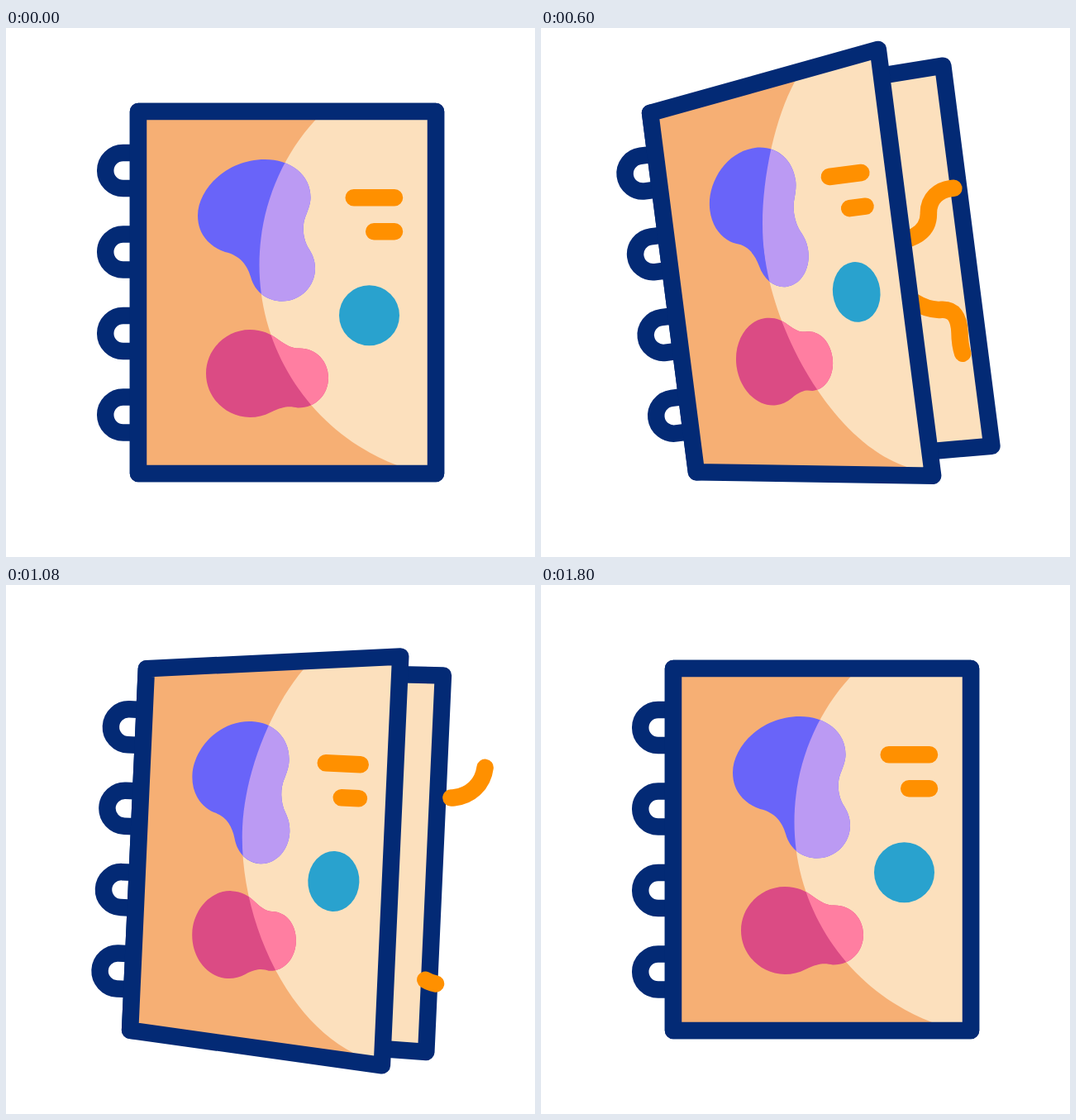
Recreate the animation shown at these times as an HTML page. Size 640 by 640 pixels, loop 2040 ms.

```html
<!DOCTYPE html>
<html lang="en">
<head>
<meta charset="utf-8">
<title>Sketchbook</title>
<style>
  html, body { margin: 0; width: 100%; height: 100%; overflow: hidden; background: #fff; }
  svg { display: block; width: 100%; height: 100%; }
  .line { fill: none; stroke-width: 20.5; stroke-linecap: round; stroke-linejoin: round; }
  .navy { stroke: #032a75; }
  .orange { stroke: #ff9000; }
</style>
</head>
<body>
<svg viewBox="0 0 640 640">
  <defs>
    <clipPath id="lit"><path id="litShape"/></clipPath>
    <path id="bean" d="M313 159C267 159 232 195 232 227C232 250 247 265 265 271C283 275 292 287 296 301C301 320 317 330.5 334 330.5C357 330.5 374 312 374 291C374 280 370 273 367 268C359 256 358 240 362 229C366 219 368.5 212 368.5 205C368.5 177 344 159 313 159Z"/>
    <path id="pear" d="M295 365C310 365 320 370 328 376C340 385 347 387.5 354 387.5C375 387 390 403 390 423C390 444 374 460 353 459.5C345 458 338 456 320 465C312 469 304 471 295 471C266 471 242 447 242 418C242 389 266 365 295 365Z"/>
    <path id="ring" d="M160 -21.5H141.7A21.5 21.5 0 0 0 141.7 21.5H160"/>
  </defs>
  <g id="book">
    <path id="page" class="line navy" style="fill:#fce0bd"/>
    <path id="upperWave" class="line orange" d="M415 293C450 296 476 290 478.6 264C481 246 495 238 509 238C520 238 526 242 539 240C559 237 573 222 574.7 202"/>
    <path id="lowerWave" class="line orange" d="M422 340C435 360 457 381 479 382C494 383 499 394 497.5 412C494 442 502 462 527 466"/>
    <g class="line navy" style="stroke-linecap:butt">
      <use href="#ring" y="172.5"/><use href="#ring" y="271"/>
      <use href="#ring" y="369.5"/><use href="#ring" y="468"/>
    </g>
    <path id="cover" fill="#f6af74"/>
    <path id="light" fill="#fce0bd"/>
    <g class="art">
      <use href="#bean" fill="#6964f9"/>
      <use href="#pear" fill="#db4b84"/>
      <circle cx="439.5" cy="347.7" r="36.5" fill="#29a2ce"/>
    </g>
    <g clip-path="url(#lit)">
      <g class="art">
        <use href="#bean" fill="#bb9af3"/>
        <use href="#pear" fill="#ff7ea1"/>
      </g>
    </g>
    <path id="bars" class="line orange"/>
    <path id="frame" class="line navy"/>
  </g>
</svg>
<script>
const LOOP = 2040, STEP = 40, END = 1800;
const SPINE = 160, TOP = 101, BOTTOM = 539, WIDTH = 360;
const $ = id => document.getElementById(id);
const set = (el, name, value) => el.setAttribute(name, value);

// Keys are [time, value]; each track is a smooth monotone curve through them.
const tilt = [[0, 0], [200, -1.2], [440, -5.1], [560, -6.9], [700, -8], [760, -7.6],
  [920, -3.39], [1220, 5.7], [1280, 5.16], [1560, -2], [1800, 0]];
const opening = [[0, 0], [575, 1], [920, 1], [1360, 0]];
const waves = [
  { el: $('upperWave'), head: [[240, 0], [440, .3], [760, .87], [900, 1]],
    tail: [[700, 0], [920, .38], [1280, .995], [1320, 1]] },
  { el: $('lowerWave'), head: [[180, 0], [440, .43], [760, .99], [800, 1]],
    tail: [[640, 0], [920, .58], [1160, 1]] }
];
for (const wave of waves) wave.length = wave.el.getTotalLength();

function track(keys, t) {
  const last = keys.length - 1;
  if (t <= keys[0][0]) return keys[0][1];
  if (t >= keys[last][0]) return keys[last][1];
  const slope = i => (keys[i + 1][1] - keys[i][1]) / (keys[i + 1][0] - keys[i][0]);
  const tangent = i => {
    if (i === 0 || i === last) return 0;
    const a = slope(i - 1), b = slope(i);
    return a * b <= 0 ? 0 : 2 * a * b / (a + b);
  };
  const i = keys.findIndex(key => key[0] > t) - 1;
  const [t0, v0] = keys[i], [t1, v1] = keys[i + 1];
  const d = t1 - t0, p = (t - t0) / d, q = 1 - p;
  return v0 * (1 + 2 * p) * q * q + v1 * (3 - 2 * p) * p * p
    + d * p * q * (tangent(i) * q - tangent(i + 1) * p);
}

// A sheet hinged on the spine whose free edge grows as it swings forward.
const sheet = (width, up, down) =>
  `M${SPINE} ${TOP}L${SPINE + width} ${TOP - up}V${BOTTOM + down}L${SPINE} ${BOTTOM}Z`;

function lightPath(scale, flare) {
  const at = (x, y) => `${SPINE + (x - SPINE) * scale} ${y} `;
  const topX = .3 * flare, topY = -.62 * flare;
  const lowX = .2 * flare, lowY = .88 * flare;
  return 'M' + at(382.5 + topX, 102 + topY) + 'L' + at(374.5 + topX, 111 + topY)
    + 'C' + at(330.6 + topX, 158.9 + topY) + at(306.5, 221.8) + at(306.5, 286.7)
    + 'C' + at(306.5, 394.1) + at(372.7 + lowX, 490.5 + lowY) + at(473 + lowX, 529 + lowY)
    + 'L' + at(495 + lowX, 537 + lowY)
    + 'L' + at(520, BOTTOM + flare) + 'L' + at(520, TOP - flare) + 'Z';
}

function draw(t) {
  const open = track(opening, t);
  const scale = 1 - .213 * open, flare = 41 * open;
  const x = value => SPINE + (value - SPINE) * scale;

  set($('book'), 'transform', `rotate(${track(tilt, t)} 160 320)`);
  set($('page'), 'd', sheet(WIDTH - 1.4 * open, .28 * flare, .35 * flare));

  for (const { el, head, tail, length } of waves) {
    const from = track(tail, t), to = track(head, t);
    el.style.display = to > from ? '' : 'none';
    set(el, 'stroke-dasharray', `${(to - from) * length} ${length * 2}`);
    set(el, 'stroke-dashoffset', -from * length);
  }

  const outline = sheet(WIDTH * scale, flare, flare);
  set($('cover'), 'd', outline);
  set($('frame'), 'd', outline);
  const light = lightPath(scale, flare);
  set($('light'), 'd', light);
  set($('litShape'), 'd', light);
  for (const art of document.querySelectorAll('.art'))
    set(art, 'transform', `translate(${SPINE * (1 - scale)} 0) scale(${scale} 1)`);
  set($('bars'), 'd', `M${x(420.7)} 205.2H${x(470)}M${x(445.2)} 246.2H${x(470)}`);
}

const start = performance.now();
function tick() {
  const t = (performance.now() - start) % LOOP;
  draw(Math.min(END, Math.floor(t / STEP) * STEP));
  requestAnimationFrame(tick);
}
tick();
</script>
</body>
</html>
```
